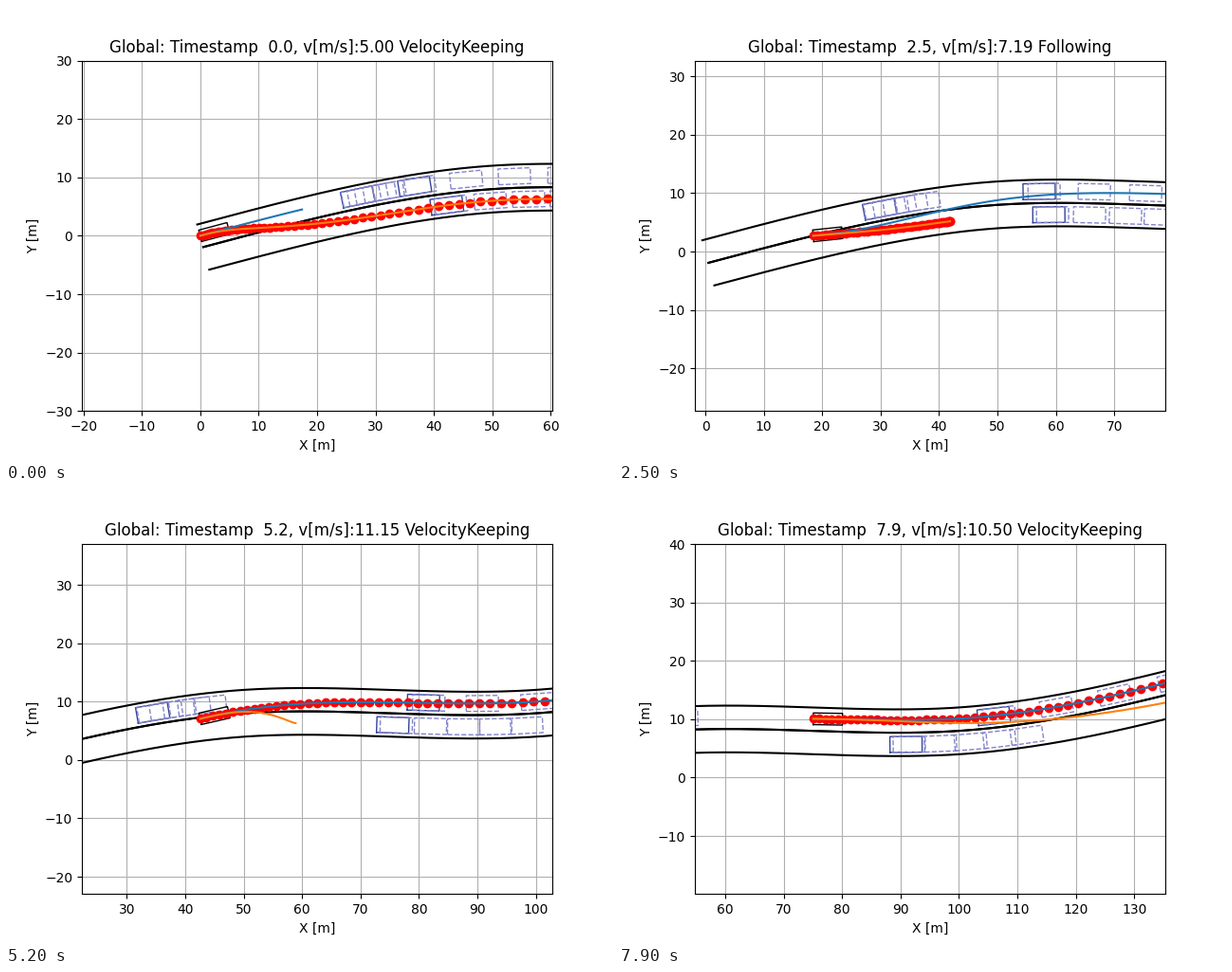
These frames come from a looping animation (640 by 480 pixels, 8 s). A matplotlib script:

```python
import numpy as np
import matplotlib.pyplot as plt
from matplotlib.animation import FuncAnimation
from matplotlib.ticker import MultipleLocator

FRAMES, DT = 80, 0.1
HORIZON, CRUISE = 5.0, 20.0


# --- road: cubic centre line of the left lane, right lane at d = -4 ---
def center(u):
    w, z = u - 50, u - 100
    first = 4 * u / 15 - 8 * u**3 / 3e5
    mid = 10 + w / 15 - 0.004 * w**2 + 16 * w**3 / 3e5
    last = 10 + z / 15 + 0.004 * z**2 - 8 * z**3 / 3e5
    return np.where(u < 50, first, np.where(u < 100, mid, last))


def heading(u):
    return np.arctan((center(u + 0.01) - center(u - 0.01)) / 0.02)


def lane(u, d):
    a = heading(u)
    return u - d * np.sin(a), center(u) + d * np.cos(a)


GRID = np.linspace(0, 180, 1801)
ARC = np.concatenate([[0], np.cumsum(np.hypot(np.diff(GRID), np.diff(center(GRID))))])


def advance(u, s):
    return np.interp(np.interp(u, GRID, ARC) + s, ARC, GRID)


# --- ego state through time ---
KEYS = np.array([0, 1.7, 2.5, 3.7, 5.2, 6.3, 7.9])


def hermite(t, values, slopes):
    i = min(np.searchsorted(KEYS, t, side="right") - 1, len(KEYS) - 2)
    h = KEYS[i + 1] - KEYS[i]
    q = (t - KEYS[i]) / h
    ease = q * q * (3 - 2 * q)
    pos = values[i] + (values[i + 1] - values[i]) * ease
    rate = h * (slopes[i] * q * (1 - q)**2 - slopes[i + 1] * q * q * (1 - q))
    return pos + rate


U = [0, 11.6, 18.0, 27.5, 42.28, 55.86, 75.07]
U_RATE = [5.6, 7.9, 7.9, 8.0, 11.9, 12.4, 11.7]
D = [0, -1.2, -2.0, -3.2, -2.22, -0.91, 0.07]
D_RATE = [0, -0.95, -1.05, -0.5, 1.2, 1.0, 0.2]
V = [5.0, 7.10, 7.19, 7.01, 11.15, 11.52, 10.50]
V_RATE = [0.9, 0.5, -0.05, 1.0, 1.5, -0.3, -0.6]


# --- planned paths ---
def shift(tau, d0, rate, goal, T):
    q = np.clip(tau / T, 0, 1)
    blend = q**3 * (10 - 15 * q + 6 * q * q)
    return d0 + (goal - d0) * blend + rate * T * (q - 6 * q**3 + 8 * q**4 - 3 * q**5)


def keep(t, ego, goal, T):
    u, d, v, rate = ego
    tau = np.arange(0, HORIZON + 0.01, DT)
    q = tau / HORIZON
    acc = np.interp(t, KEYS, [0, 0, 2, 3, 1.5, 0, 0])
    s = HORIZON * (v * q + (CRUISE - v) * (q**3 - q**4 / 2)
                   + acc * HORIZON * (q**2 / 2 - 2 * q**3 / 3 + q**4 / 4))
    return lane(advance(u, s), shift(tau, d, rate, goal, T))


def follow(ego, goal, T, length):
    u, d, v, rate = ego
    tau = np.arange(0, T + 0.01, DT)
    left = np.clip(1 - tau / T, 0, 1)
    s = length * (1 - left**(v * T / length))
    return lane(advance(u, s), shift(tau, d, rate, goal, T))


def left_path(t, ego):
    if t < 2.05:
        return follow(ego, 0, 4 - 0.3 * t, 18 - 3.3 * t)
    return keep(t, ego, 0, np.interp(t, [2.5, 3.7, 5.2], [4.8, 3.6, 3.5]))


def right_path(t, ego):
    if t < 0.95:
        return keep(t, ego, -4, 4)
    if t > 6.95:
        return keep(t, ego, -4, 6)
    T = np.interp(t, [2.5, 3.7, 5.2], [5, 4, 3])
    length = np.interp(t, [1.7, 2.5, 3.7, 5.2, 6.3, 7], [24.9, 23.8, 22, 16.6, 9.8, 6])
    return follow(ego, -4, T, length)


# --- other cars: start, speed, half acceleration, lane offset ---
CARS = [(26.95, 0.9, 0.103, 0), (36.7, 7.9, 0.11, 0), (41.7, 7.1, -0.11, -4)]


def box(x, y, a, back, front, width):
    px = np.array([back, front, front, back, back])
    py = np.array([-1, -1, 1, 1, -1]) * width / 2
    return x + px * np.cos(a) - py * np.sin(a), y + px * np.sin(a) + py * np.cos(a)


def car_box(car, t):
    start, v, acc, d = car
    u = start + v * t + acc * t * t
    x, y = lane(u, d)
    return box(x, y, heading(u), -2.75, 2.75, 2.7)


fig, ax = plt.subplots(figsize=(6.4, 4.8), dpi=100)
ax.grid(True)
ax.set_xlabel("X [m]")
ax.set_ylabel("Y [m]")
ax.xaxis.set_major_locator(MultipleLocator(10))
ax.yaxis.set_major_locator(MultipleLocator(10))
for offset in (2, -2, -2, -6):
    ax.plot(*lane(GRID, offset), "k", lw=1.5)

solid = [ax.plot([], [], color="#34429a", lw=1)[0] for _ in CARS]
ghosts = [[ax.plot([], [], "--", color="#8484cc", lw=1)[0] for _ in range(5)] for _ in CARS]
body, = ax.plot([], [], "k", lw=1)
best, = ax.plot([], [], "-or")
blue, = ax.plot([], [], color="tab:blue")
orange, = ax.plot([], [], color="tab:orange")
HALF_W, HALF_H = 30 * 496 / 369.6, 30


def update(i):
    t = i * DT
    u, d, v = hermite(t, U, U_RATE), hermite(t, D, D_RATE), hermite(t, V, V_RATE)
    rate = np.interp(t, KEYS, D_RATE)
    ego = u, d, v, rate
    x, y = lane(u, d)
    yaw = heading(u) + np.arctan2(rate, np.interp(t, KEYS, U_RATE))
    body.set_data(*box(x, y, yaw, 0, 5, 2))

    to_left, to_right = left_path(t, ego), right_path(t, ego)
    blue.set_data(*to_left)
    orange.set_data(*to_right)
    best.set_data(*(to_left if t > 3.45 else to_right))

    for car, line, dashed in zip(CARS, solid, ghosts):
        line.set_data(*car_box(car, t))
        for k, ghost in enumerate(dashed):
            ghost.set_data(*car_box(car, t + DT + k))

    ax.set_xlim(x + 20 - HALF_W, x + 20 + HALF_W)
    ax.set_ylim(y - HALF_H, y + HALF_H)
    mode = "Following" if 0.95 < t < 3.45 else "VelocityKeeping"
    ax.set_title(f"Global: Timestamp {t:4.1f}, v[m/s]:{v:.2f} {mode}")


anim = FuncAnimation(fig, update, frames=FRAMES, init_func=lambda: update(0),
                     interval=100, repeat=True, repeat_delay=0, blit=False)
plt.show()
```
